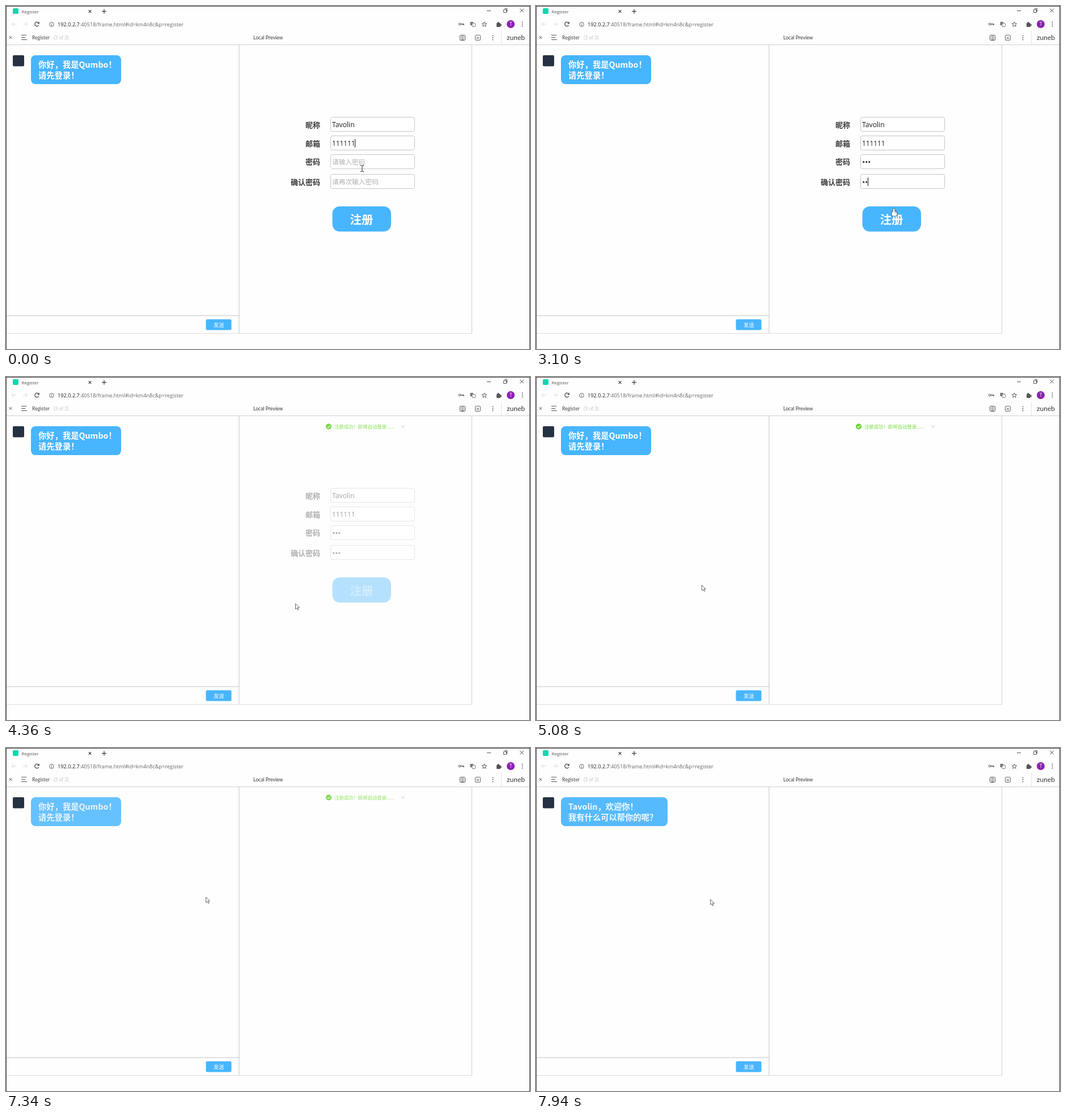
Animation, 924 px wide and 606 px high, one loop 8000 ms. Source, as an HTML page with a canvas:

```html
<!DOCTYPE html>
<html lang="zh">
<head>
<meta charset="utf-8">
<title>Register</title>
<style>
  html, body { margin: 0; width: 100%; height: 100%; overflow: hidden; background: #fefefe; }
  canvas { display: block; }
</style>
</head>
<body>
<canvas id="stage" width="924" height="606"></canvas>
<script>
const ctx = document.getElementById('stage').getContext('2d');
const LOOP = 8000;
const BLUE = '#48b5ff';
const CJK = '"Noto Sans CJK SC", "Noto Sans CJK", sans-serif';
const SANS = '"Open Sans", "Noto Sans", sans-serif';
const LATO = 'Lato, sans-serif';
const USER = 'Tavolin';

const SUBMIT = 3840;    // the form is sent
const KEY_GAP = 200;    // time between typed characters
const BLINK = 400;      // half a caret period
const MAX_DOTS = 3;

const FIELDS = [
  { label: '昵称', mid: 209.5, value: USER, size: 12.2 },
  { label: '邮箱', mid: 242.5, value: '111111', size: 11.8, focusAt: 0 },
  { label: '密码', mid: 275, hint: '请输入密码', focusAt: 270, typeAt: 1300 },
  { label: '确认密码', mid: 310.5, hint: '请再次输入密码', focusAt: 2600, typeAt: 2700 }
];

// Turning points of the pointer: time, x, y
const PATH = [
  [0, 628, 287], [1400, 633, 281], [2000, 617, 311], [2600, 617, 311],
  [3100, 631, 358], [SUBMIT, 636, 378], [4340, 510, 400], [4540, 348, 394],
  [4840, 287, 382], [5340, 299, 345], [5940, 396, 327], [6240, 385, 320],
  [7040, 332, 290], [7340, 352, 263], [7940, 307, 267]
];

const clamp = (v, lo, hi) => Math.min(hi, Math.max(lo, v));
const ramp = (t, from, to) => clamp((t - from) / (to - from), 0, 1);

// Motion runs at ten pictures a second, slightly delayed once the form is sent.
function stepOf(t) {
  const lag = t < SUBMIT ? 0 : 40;
  return Math.floor((t - lag) / 100) * 100 + lag;
}

function pointerAt(t) {
  const i = PATH.findIndex(k => k[0] > t);
  if (i < 0) return PATH[PATH.length - 1].slice(1);
  const [t0, x0, y0] = PATH[i - 1], [t1, x1, y1] = PATH[i];
  const p = ramp(t, t0, t1);
  return [x0 + (x1 - x0) * p, y0 + (y1 - y0) * p];
}

function text(str, x, y, font, color, align = 'left') {
  ctx.font = font;
  ctx.fillStyle = color;
  ctx.textAlign = align;
  ctx.fillText(str, x, y);
}

function rect(x, y, w, h, color) {
  ctx.fillStyle = color;
  ctx.fillRect(x, y, w, h);
}

function paint(fill, stroke, width = 1) {
  if (fill) { ctx.fillStyle = fill; ctx.fill(); }
  if (stroke) { ctx.strokeStyle = stroke; ctx.lineWidth = width; ctx.stroke(); }
}

function round(x, y, w, h, r, fill, stroke, width) {
  ctx.beginPath();
  ctx.roundRect(x, y, w, h, r);
  paint(fill, stroke, width);
}

function circle(x, y, r, fill, stroke) {
  ctx.beginPath();
  ctx.arc(x, y, r, 0, Math.PI * 2);
  paint(fill, stroke);
}

function trace(points) {
  ctx.beginPath();
  for (let i = 0; i < points.length; i += 2) ctx.lineTo(points[i], points[i + 1]);
}

function line(points, color, width = 1) {
  trace(points);
  paint(null, color, width);
}

function cross(x, y, r, color, width) {
  line([x - r, y - r, x + r, y + r], color, width);
  line([x - r, y + r, x + r, y - r], color, width);
}

function dots(x, y) {
  for (const d of [-3.5, 0, 3.5]) circle(x, y + d, 0.9, '#555');
}

function navArrow(x, dir) {
  line([x - 4 * dir, 32, x + 4 * dir, 32], '#d8d8d8');
  line([x + dir / 2, 28.5, x + 4 * dir, 32, x + dir / 2, 35.5], '#d8d8d8');
}

function star(x, y, r) {
  ctx.beginPath();
  for (let i = 0; i < 10; i++) {
    const a = -Math.PI / 2 + i * Math.PI / 5, d = i % 2 ? r * 0.45 : r;
    ctx.lineTo(x + d * Math.cos(a), y + d * Math.sin(a));
  }
  ctx.closePath();
  paint(null, '#555');
}

function faded(alpha, draw) {
  if (alpha <= 0) return;
  ctx.save();
  ctx.globalAlpha = alpha;
  draw();
  ctx.restore();
}

function drawTabs() {
  round(12, 4, 10, 10, 2, '#10d6ae');
  text('Register', 27.5, 13, '8px ' + SANS, '#555');
  cross(148, 9.5, 2.3, '#333', 1.1);
  line([169, 9.5, 177, 9.5], '#333', 1.2);
  line([173, 5.5, 173, 13.5], '#333', 1.2);

  line([848, 8.5, 855, 8.5], '#555');
  round(877.5, 6.5, 5, 5, 0, null, '#555');
  line([879, 4.5, 883.5, 4.5, 883.5, 10], '#555');
  cross(909.5, 8, 3.2, '#444');
}

function drawAddressBar() {
  navArrow(14, -1);
  navArrow(34, 1);
  ctx.beginPath();
  ctx.arc(54.5, 32, 3.7, 0.5, 5.6);
  paint(null, '#444', 1.2);
  trace([58.8, 27.5, 58.8, 31.5, 55, 31.5]);
  paint('#444');

  circle(80.5, 32.5, 3.8, null, '#666');
  rect(80, 32, 1, 3, '#666');
  rect(80, 30, 1, 1, '#666');
  const host = '192.0.2.7', font = '9.2px ' + SANS;
  text(host, 91, 35.5, font, '#222');
  text(':40518/frame.html#id=km4n8c&p=register', 91 + ctx.measureText(host).width, 35.5, font, '#666');

  circle(800, 32, 1.8, null, '#555');
  line([802, 32, 807, 32, 807, 34], '#555', 1.5);
  round(818.5, 28, 5.5, 6, 1, '#777');
  round(822, 30.5, 5.5, 6, 1, '#fefefe', '#777');
  star(843.5, 32.5, 4.5);
  round(865, 30, 7, 7, 1, '#555');
  circle(868, 29.5, 1.6, '#555');
  circle(872.5, 33.5, 1.6, '#555');
  circle(890, 32, 7, '#8a22b0');
  text('T', 890, 35.2, '8.5px ' + SANS, '#fff', 'center');
  dots(910.5, 32);
}

function drawToolbar() {
  cross(8, 55.5, 2.2, '#444');
  for (const [y, w] of [[51.5, 9], [55.5, 7], [59.5, 10]]) line([27, y, 27 + w, y], '#555');
  text('Register', 46, 59, '8.7px ' + LATO, '#444');
  text('(3 of 3)', 84, 59, '8.5px ' + LATO, '#c4c4c4');
  text('Local Preview', 436, 59, '8.7px ' + LATO, '#333');

  round(800.5, 51.5, 9, 9, 1, null, '#555');
  for (let y = 53.5; y < 60; y += 2) line([802.5, y, 807.5, y], '#555', 0.8);
  round(827.5, 51.5, 9, 9, 1, null, '#666');
  cross(832, 56.5, 2.3, '#555');
  dots(858.5, 56);
  rect(873, 44, 1, 24, '#e4e4e4');
  text('zuneb', 899, 60, '12px ' + LATO, '#333', 'center');
}

function drawPanels() {
  rect(0, 68, 924, 1, '#d0d0d0');
  rect(410.5, 68, 1, 511, '#c4c4c4');
  rect(821, 68, 1, 511, '#d0d0d0');
  rect(0, 546.5, 411, 1, '#c4c4c4');
  rect(0, 578, 822, 1, '#dcdcdc');
  round(352.5, 553.5, 45, 19, 2.5, BLUE);
  text('发送', 375.2, 566.6, '500 9.3px ' + CJK, '#fff', 'center');
  ctx.strokeStyle = '#444';
  ctx.lineWidth = 1;
  ctx.strokeRect(0.5, 0.5, 923, 620);
}

function drawBubble(width, ...lines) {
  round(44, 87, width, 51, 8, BLUE);
  lines.forEach((str, i) => text(str, 57, 109 + i * 19, 'bold 14.3px ' + CJK, '#fff'));
}

function drawChat(t) {
  round(12, 87, 20, 19.5, 2, '#263143');
  faded(1 - ramp(t, 7240, 7840), () => drawBubble(159, '你好，我是Qumbo！', '请先登录！'));
  faded(ramp(t, 7340, 7990), () => drawBubble(188, USER + '，欢迎你！', '我有什么可以帮你的呢？'));
}

function dotsTyped(field, t) {
  return field.typeAt ? clamp(Math.floor((t - field.typeAt) / KEY_GAP), 0, MAX_DOTS) : 0;
}

function drawField(field, t) {
  const { label, mid, value, hint, size } = field;
  text(label, 554, mid + 5, 'bold 13px ' + CJK, '#3a3a3a', 'right');
  round(572.5, Math.floor(mid - 13) + 0.5, 148, 25, 3, '#fff', '#c4c4c4');
  const typed = dotsTyped(field, t);
  if (value) text(value, 575, mid + 4.5, size + 'px ' + SANS, '#1c1c1c');
  else if (!typed) text(hint, 575, mid + 4.5, '11.7px ' + CJK, '#b0b0b0');
  for (let i = 0; i < typed; i++) circle(577.7 + i * 5, mid + 0.5, 1.6, '#222');
}

function drawCaret(t) {
  const field = FIELDS.filter(f => f.focusAt <= t).pop();
  const typed = dotsTyped(field, t);
  const touched = typed ? field.typeAt + typed * KEY_GAP : field.focusAt;
  const lit = (t - touched) % (2 * BLINK) < BLINK;
  if (!lit || t >= SUBMIT) return;
  rect(field.value ? 615 : 575 + typed * 5, Math.round(field.mid - 7.5), 1, 15, '#111');
}

function drawForm(t) {
  for (const field of FIELDS) drawField(field, t);
  drawCaret(t);
  round(575.5, 354, 103.5, 44.5, 13, BLUE);
  text('注册', 627, 385, 'bold 20.5px ' + CJK, '#fff', 'center');
}

function drawNotice() {
  circle(569, 87.5, 5, '#65d62c');
  line([566.5, 87.7, 568.3, 89.5, 571.6, 85.8], '#fff', 1.2);
  text('注册成功！即将自动登录', 579, 90.8, '8.4px ' + CJK, '#78de3c');
  text('......', 671.5, 90.8, '8.4px ' + SANS, '#78de3c');
  cross(700, 87.5, 2.6, '#ccc');
}

function handShape(fill, stroke) {
  round(-1.3, 0, 2.7, 9, 1.3, fill, stroke, 1.6);
  round(-3.6, 5.2, 9, 7.6, 2.6, fill, stroke, 1.6);
}

function drawPointer(x, y) {
  const onButton = x > 576 && x < 679 && y > 354 && y < 399;
  const onField = x > 560 && y < 325;
  ctx.save();
  ctx.translate(x, y);
  if (onButton) {
    handShape(null, '#444');
    handShape('#fff');
    for (const dx of [1.7, 3.5]) line([dx, 5.5, dx, 8], '#666', 0.6);
  } else if (onField) {
    for (const s of [-1, 1]) line([-3, 5.5 * s, -1, 5.5 * s, 0, 4.5 * s, 1, 5.5 * s, 3, 5.5 * s], '#222');
    line([0, -5, 0, 5], '#222');
  } else {
    trace([0.5, 0.5, 0.5, 10, 2.8, 8, 4.4, 11.5, 6, 10.8, 4.5, 7.4, 7.5, 7.2]);
    ctx.closePath();
    paint('#fff', '#555', 0.9);
  }
  ctx.restore();
}

function draw(now) {
  const t = now % LOOP, step = stepOf(t);
  rect(0, 0, 924, 606, '#fefefe');
  drawTabs();
  drawAddressBar();
  drawToolbar();
  drawPanels();
  drawChat(step);
  faded(1 - ramp(step, 4040, 4540), () => drawForm(t));
  faded(ramp(step, 3940, 4380) * (1 - ramp(step, 7240, 7840)), drawNotice);
  drawPointer(...pointerAt(step));
}

const begin = performance.now();
function loop() {
  draw(performance.now() - begin);
  requestAnimationFrame(loop);
}
loop();
</script>
</body>
</html>
```
